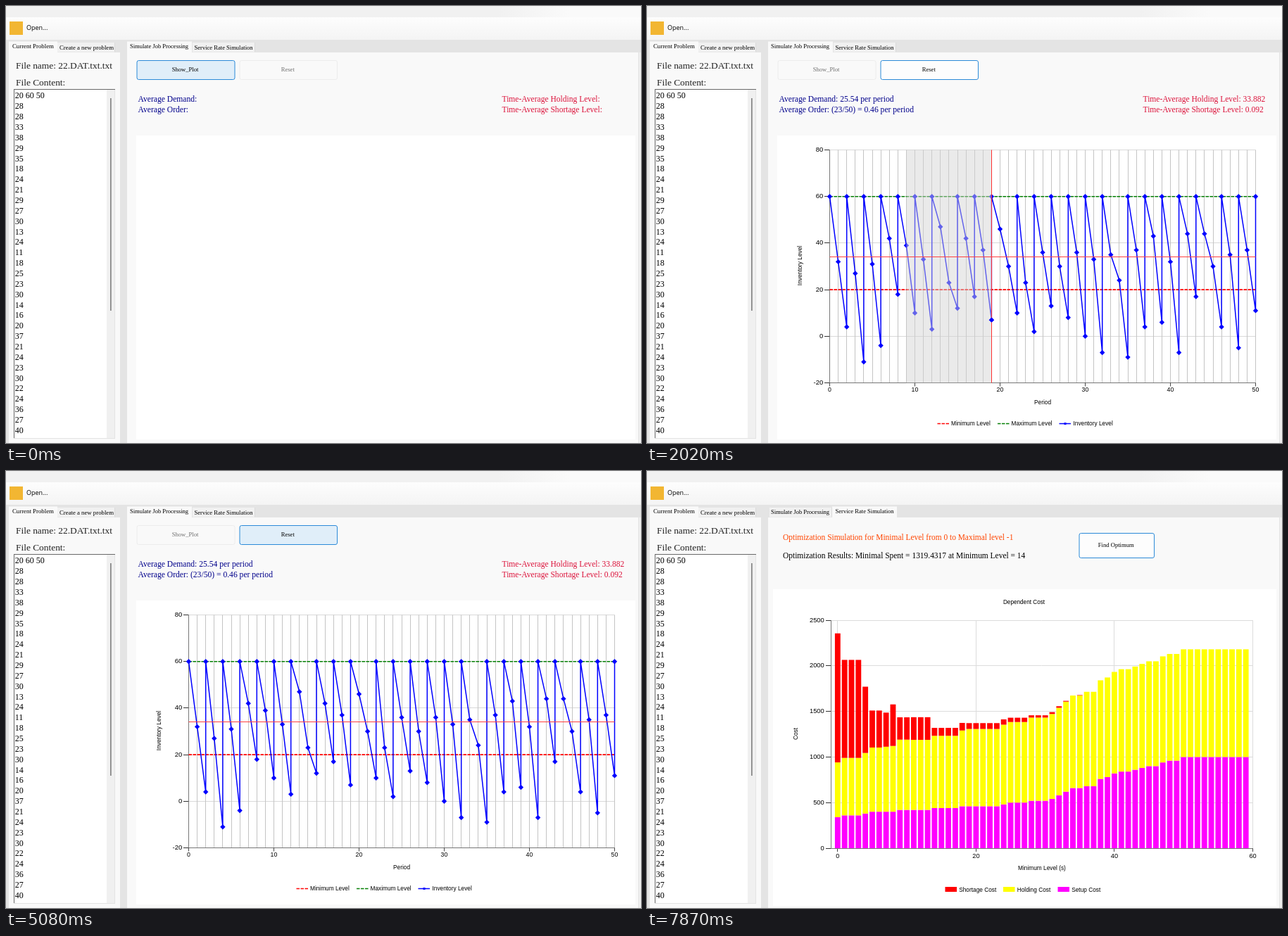
Animation, 902 px wide and 621 px high, one loop 9.85 s. Source, as an HTML page with a canvas:

```html
<!DOCTYPE html>
<html lang="en">
<head>
<meta charset="utf-8">
<title>Inventory simulation</title>
<style>
html, body { margin: 0; width: 100%; height: 100%; overflow: hidden; background: #f9f9f9; }
canvas { display: block; }
</style>
</head>
<body>
<canvas id="stage" width="902" height="621"></canvas>
<script>
const ctx = document.getElementById('stage').getContext('2d');
const LOOP = 9850;
const SERIF = '"Liberation Serif", serif';
const SANS = '"Liberation Sans", sans-serif';
const BLUE = '#0000ff', RED = '#ff0000', GREEN = '#008000';
const MAX = 60, PERIODS = 50;

const demand = [
  28, 28, 33, 38, 29, 35, 18, 24, 21, 29, 27, 30, 13, 24, 11, 18, 25,
  23, 30, 14, 16, 20, 37, 21, 24, 23, 30, 22, 24, 36, 27, 40, 25, 11,
  33, 23, 33, 17, 37, 28, 39, 16, 27, 16, 14, 26, 25, 40, 23, 26];

// Refill to MAX whenever stock ends a period below the minimum level.
function simulate(min) {
  const path = [[0, MAX]];
  let level = MAX, orders = 0, held = 0, short = 0;
  demand.forEach((d, i) => {
    const end = level - d;
    if (end >= 0) held += (level + end) / 2;
    else if (level <= 0) short -= (level + end) / 2;
    else {
      held += level * level / (2 * d);
      short += end * end / (2 * d);
    }
    path.push([i + 1, end]);
    level = end;
    if (end < min || i === PERIODS - 1) {
      level = MAX;
      orders++;
      path.push([i + 1, MAX]);
    }
  });
  return { path, setup: 20 * orders, hold: 25 * held / PERIODS, short: 700 * short / PERIODS };
}

const levels = simulate(20).path;
const costs = Array.from({ length: MAX }, (_, s) => simulate(s));

function box(x, y, w, h, fill) {
  ctx.fillStyle = fill;
  ctx.fillRect(x, y, w, h);
}

function seg(x1, y1, x2, y2, color, width = 1, dash = []) {
  ctx.strokeStyle = color;
  ctx.lineWidth = width;
  ctx.setLineDash(dash);
  ctx.beginPath();
  ctx.moveTo(x1, y1);
  ctx.lineTo(x2, y2);
  ctx.stroke();
  ctx.setLineDash([]);
}

// y is the middle of the capitals.
function text(str, x, y, size, color = '#000', family = SERIF, align = 'left') {
  ctx.font = `${size}px ${family}`;
  ctx.fillStyle = color;
  ctx.textAlign = align;
  ctx.fillText(str, x, y + size * 0.34);
}

function label(str, x, y, size = 8.3, align = 'center') {
  text(str, x, y, size, '#000', SANS, align);
}

function sideLabel(str, x, y) {
  ctx.save();
  ctx.translate(x, y);
  ctx.rotate(-Math.PI / 2);
  label(str, 0, 0);
  ctx.restore();
}

const LOOKS = {
  normal: ['#fdfdfd', '#d2d2d2', '#000'],
  focus: ['#fdfdfd', '#2b8ad8', '#000'],
  hover: ['#e0eef9', '#2b8ad8', '#000'],
  down: ['#cce4f7', '#2b74b0', '#000'],
  off: ['#f9f9f9', '#ececec', '#707070']
};

function button(str, x, y, w, h, look) {
  const [fill, edge, ink] = LOOKS[look];
  ctx.beginPath();
  ctx.roundRect(x + 0.5, y + 0.5, w - 1, h - 1, 2.5);
  ctx.fillStyle = fill;
  ctx.fill();
  ctx.strokeStyle = edge;
  ctx.lineWidth = 1;
  ctx.stroke();
  text(str, x + w / 2 - 1, y + h / 2 - 0.5, 8.6, ink, SERIF, 'center');
}

function tab(str, x, w, tx, active, size) {
  if (active) box(x - 2, 50.5, w + 3, 16, '#f9f9f9');
  else {
    box(x, 52, w, 13.5, '#f1f1f1');
    box(x + w - 1, 52, 1, 13.5, '#dadada');
  }
  text(str, tx, active ? 57.3 : 58.6, size);
}

function shell(tabIndex) {
  box(0, 0, 902, 621, '#e4e4e4');
  const strip = ctx.createLinearGradient(700, 0, 800, 0);
  strip.addColorStop(0, '#f1f1f1');
  strip.addColorStop(1, '#fafafa');
  box(0, 0, 902, 16, strip);
  const bar = ctx.createLinearGradient(0, 16, 0, 48);
  bar.addColorStop(0, '#fdfdfd');
  bar.addColorStop(1, '#f4f4f4');
  box(0, 16, 902, 32, bar);
  box(5, 22, 19, 19, '#f2b632');
  text('Open...', 29, 30.5, 9, '#000', '"Open Sans", sans-serif');

  box(4, 66, 158, 555, '#f9f9f9');
  box(172, 66, 726, 555, '#f9f9f9');
  box(899, 66, 3, 555, '#efefef');
  tab('Current Problem', 6, 66, 9, true, 8.8);
  tab('Create a new problem', 73, 82, 76, false, 8.75);
  tab('Simulate Job Processing', 174, 89, 176, tabIndex === 0, 8.5);
  tab('Service Rate Simulation', 265, 89, 267.5, tabIndex === 1, 8.55);

  text('File name: 22.DAT.txt.txt', 14, 84, 13.4, '#222');
  text('File Content:', 14, 108, 13.4, '#222');
  box(11, 118, 144, 497, '#e3e3e3');
  box(11, 118, 144, 1, '#696969');
  box(11, 118, 1, 496, '#696969');
  box(12, 119, 131, 495, '#fff');
  box(143, 119, 11, 495, '#f0f0f0');
  box(148, 131, 1.7, 302, '#858585');
  ctx.save();
  ctx.beginPath();
  ctx.rect(12, 119, 131, 495);
  ctx.clip();
  ['20 60 50', ...demand.slice(0, 33)].forEach((row, i) => text(row, 12.8, 127.3 + i * 14.86, 12));
  ctx.restore();
}

function diamond(x, y) {
  const r = 3.7;
  ctx.fillStyle = BLUE;
  ctx.beginPath();
  ctx.moveTo(x, y - r);
  ctx.lineTo(x + r, y);
  ctx.lineTo(x, y + r);
  ctx.lineTo(x - r, y);
  ctx.fill();
}

function arrow(x, y, dir) {
  ctx.fillStyle = '#444';
  ctx.beginPath();
  ctx.moveTo(x + 4 * dir, y);
  ctx.lineTo(x - 3 * dir, y - 4);
  ctx.lineTo(x - 3 * dir, y + 4);
  ctx.fill();
}

function raised(x, y, w, h, fill, sunk = false) {
  box(x, y, w, h, sunk ? '#8a8a8a' : '#4a4a4a');
  box(x, y, w - 1, h - 1, sunk ? '#8a8a8a' : '#e4e4e4');
  box(x + 1, y + 1, w - 2, h - 2, fill);
}

function scrollBar(pressed) {
  box(260, 521, 604, 15, '#808080');
  box(260, 522, 604, 13, '#d3d3d3');
  raised(260, 521, 14, 15, pressed ? '#b4b4b4' : '#c4c4c4', pressed);
  const ink = pressed ? '#777' : '#444';
  ctx.strokeStyle = ink;
  ctx.lineWidth = 1;
  ctx.beginPath();
  ctx.arc(267, 528.5, 4.2, 0, 7);
  ctx.stroke();
  seg(264.5, 528.5, 269.5, 528.5, ink);
  raised(274, 521, 14, 15, '#b8b8b8');
  arrow(280.5, 528.5, -1);
  raised(381, 521, 117, 15, '#a9a9a9');
  raised(850, 521, 14, 15, '#b8b8b8');
  arrow(857, 528.5, 1);
}

function levelChart({ from, to, bottom, step, cursorY, select, scroll }) {
  const L = 259.5, R = 864.5, T = 204.5, base = 535.5;
  const px = x => L + (x - from) / (to - from) * (R - L);
  const py = y => bottom - (y + 20) / 100 * (bottom - T);
  const snap = v => Math.floor(v) + 0.5;

  for (let y = -20; y <= 80; y += 20) {
    const yy = snap(py(y));
    seg(L, yy, R, yy, '#d9d9d9');
    seg(252, yy, L, yy, '#333');
    label(y, 250.3, yy - 0.3, 9.5, 'right');
  }
  for (let x = from; x <= to; x++) seg(snap(px(x)), T, snap(px(x)), bottom, '#c4c4c4');
  seg(L, T, L, base, '#777');
  seg(L, base, R, base, '#777');
  for (let x = from; x <= to; x += step) {
    seg(snap(px(x)), base, snap(px(x)), base + 5, '#444');
    label(x, px(x), 545.3, 8.8);
  }

  seg(L, py(20), R, py(20), RED, 1.6, [4.5, 1.5]);
  seg(L, py(MAX), R, py(MAX), GREEN, 1.6, [4.5, 1.5]);
  const shown = levels.filter(([x]) => x >= from && x <= to);
  if (from) shown.shift();
  const pts = (from ? [[from, 18], ...shown] : shown).map(([x, y]) => [px(x), py(y)]);
  ctx.strokeStyle = BLUE;
  ctx.lineWidth = 1.5;
  ctx.lineJoin = 'round';
  ctx.beginPath();
  pts.forEach(([x, y]) => ctx.lineTo(x, y));
  ctx.stroke();
  pts.forEach(([x, y]) => diamond(x, y));

  if (select) {
    box(px(9), T, px(select) - px(9), bottom - T, 'rgba(211,211,211,.47)');
    seg(snap(px(select)), T, snap(px(select)), bottom, '#ff3030');
    diamond(px(select), py(levels.find(([x]) => x === select)[1]));
  }
  if (cursorY) seg(L, snap(py(cursorY)), R, snap(py(cursorY)), '#ff4040');
  if (scroll) scrollBar(scroll === 'down');

  sideLabel('Inventory Level', 217, (T + bottom) / 2 - 1);
  label('Period', 562, 563);
  seg(412.5, 593.5, 429, 593.5, RED, 1.6, [4.5, 1.5]);
  label('Minimum Level', 432, 593.5, 8.3, 'left');
  seg(498, 593.5, 514.5, 593.5, GREEN, 1.6, [4.5, 1.5]);
  label('Maximum Level', 517.5, 593.5, 8.3, 'left');
  seg(585.5, 593.5, 602, 593.5, BLUE, 1.5);
  box(592.5, 592, 3, 3, BLUE);
  label('Inventory Level', 605.5, 593.5, 8.3, 'left');
}

function costChart() {
  const L = 261, R = 860.5, T = 212, base = 536, unit = (R - L) / 61;
  const px = s => L + (s + 1) * unit;
  const py = v => base - v * (base - T) / 2500;
  label('Dependent Cost', 535.5, 186.5, 8.2);
  for (let v = 0; v <= 2500; v += 500) {
    const y = Math.floor(py(v)) + 0.5;
    seg(L, y, R, y, '#dcdcdc');
    seg(254, y, L, y, '#333');
    label(v, 251.8, y - 0.3, 9.4, 'right');
  }
  for (let s = 0; s <= MAX; s += 20) {
    const x = Math.floor(px(s)) + 0.5;
    seg(x, T, x, base, '#dcdcdc');
    seg(x, base, x, base + 5, '#444');
    label(s, px(s), 546.5, 9.2);
  }
  seg(L + 0.5, T, L + 0.5, base, '#777');
  seg(L, base + 0.5, R, base + 0.5, '#777');
  costs.forEach((c, s) => {
    let sum = 0;
    [[c.setup, '#ff00ff'], [c.hold, '#ffff00'], [c.short, RED]].forEach(([v, color]) => {
      const y = py(sum + v);
      box(px(s) - unit * 0.4, y, unit * 0.8, py(sum) - y, color);
      sum += v;
    });
  });
  sideLabel('Cost', 211, 373.5);
  label('Minimum Level (s)', 561, 564);
  [['Shortage Cost', 423.5, RED], ['Holding Cost', 506, '#ffff00'], ['Setup Cost', 583.5, '#ff00ff']]
    .forEach(([name, x, color]) => {
      box(x, 591, 16.5, 7, color);
      label(name, x + 19.7, 595, 8.3, 'left');
    });
}

function jobPage(t) {
  const plotted = t >= 540 && t < 5380;
  const filled = t >= 310 && t < 5380;
  let show = 'off', reset = 'off';
  if (plotted) reset = t < 5080 ? 'focus' : t < 5170 ? 'hover' : 'down';
  else if (t >= 5380) show = 'focus';
  else show = t >= 140 && t < 225 ? 'down' : 'hover';
  button('Show_Plot', 185.5, 77, 140, 28, show);
  button('Reset', 331.5, 77, 139.5, 28, reset);

  const tail = s => filled ? ' ' + s : '';
  text('Average Demand:' + tail('25.54 per period'), 187.5, 132, 11.6, '#00008b');
  text('Average Order:' + tail('(23/50) = 0.46 per period'), 187.5, 147, 11.6, '#00008b');
  text('Time-Average Holding Level:' + tail('33.882'), 704.5, 132, 11.55, '#dc143c');
  text('Time-Average Shortage Level:' + tail('0.092'), 704.5, 147, 11.55, '#dc143c');

  box(185, 184, 709, 432, '#fff');
  if (!plotted) return;
  const view = { from: 0, to: PERIODS, bottom: 535.5, step: 10 };
  if (t >= 1480) view.cursorY = 34;
  if (t >= 1480 && t < 2500) {
    const k = Math.min(7, Math.floor((t - 1480) / 77));
    view.select = 11 + Math.round(k * 8 / 7);
    if (k < 3) view.cursorY = 33;
  } else if (t >= 2500 && t < 4050) {
    Object.assign(view, { from: 8, to: 20, bottom: 521, step: 1, scroll: t < 3900 ? 'up' : 'down' });
  }
  levelChart(view);
}

function ratePage(t) {
  const done = t >= 6540;
  const look = t < 6090 ? 'normal' : t < 6400 ? 'hover' : t < 6480 ? 'down' : t < 7870 ? 'hover' : 'focus';
  text('Optimization Simulation for Minimal Level from 0 to Maximal level -1', 193, 94, 11.43, '#ff4500');
  text('Optimization Results:' + (done ? ' Minimal Spent = 1319.4317 at Minimum Level = 14' : ''), 193, 120, 11.45);
  button('Find Optimum', 613.5, 88, 107.5, 36, look);
  box(179, 168, 715, 450, '#fff');
  if (done) costChart();
}

function draw(now) {
  const t = now % LOOP;
  const second = t >= 5470;
  shell(second ? 1 : 0);
  if (second) ratePage(t);
  else jobPage(t);
}

const start = performance.now();
function frame() {
  draw(performance.now() - start);
  requestAnimationFrame(frame);
}
frame();
</script>
</body>
</html>
```
